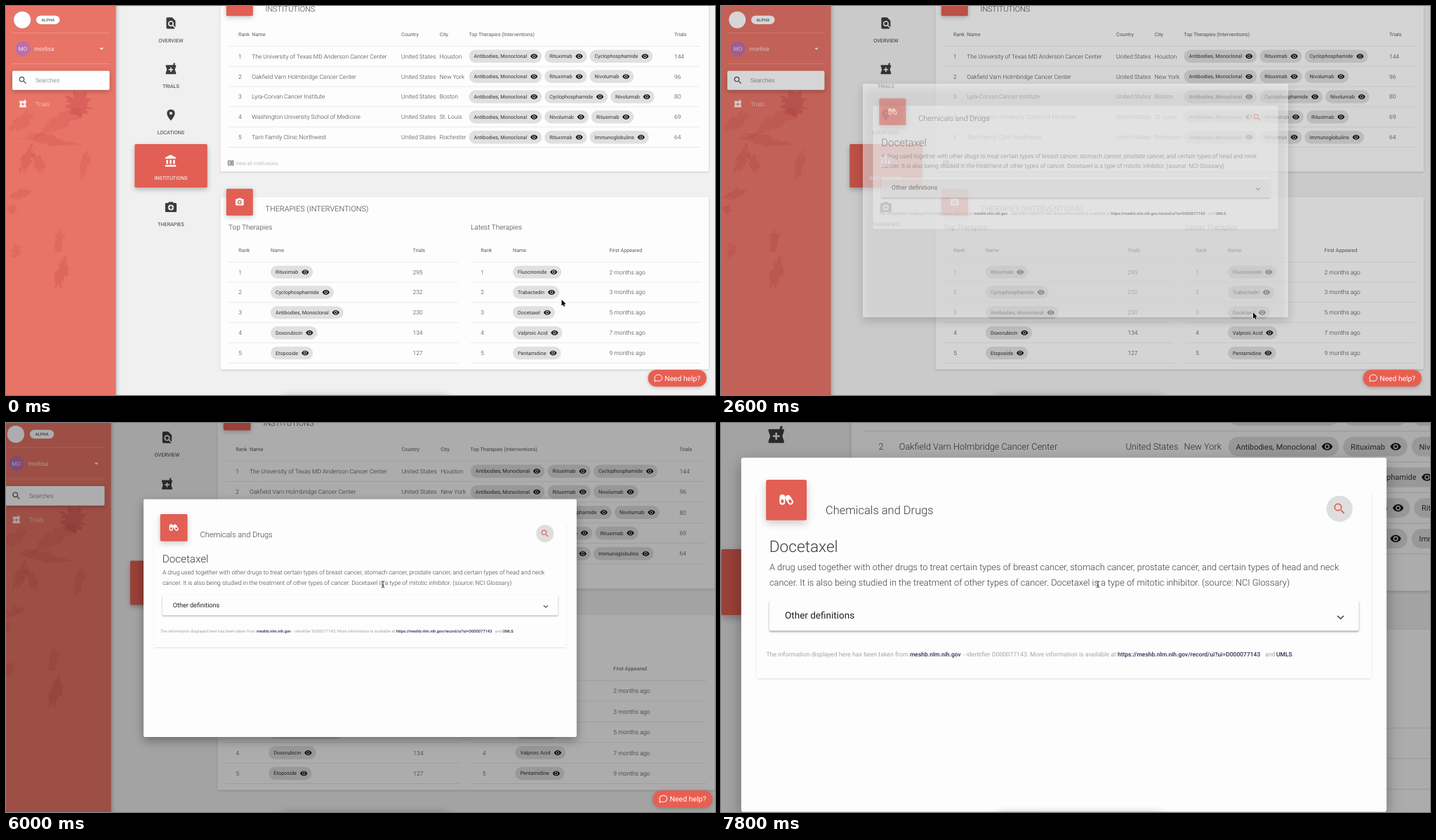
An HTML page with a canvas for the animation above (8 s loop, 1010 by 555 pixels).

```html
<!DOCTYPE html>
<html lang="en">
<head>
<meta charset="utf-8">
<title>Trial dashboard</title>
<style>
  html, body { margin: 0; width: 100%; height: 100%; overflow: hidden; background: #eee; }
  canvas { display: block; width: 1010px; height: 555px; }
</style>
</head>
<body>
<canvas id="stage" width="1010" height="555"></canvas>
<script>
const W = 1010, H = 555, LOOP = 8000, STEP = 200;
const ctx = document.getElementById('stage').getContext('2d');
const RED = '#e15f54', INK = '#3c3c3c', RULE = '#e2e2e2';
const BODY = 8.43, SMALL = 7.25;
const FOCUS = { x: 537, y: 230 };
let zoom = 1;

const icons = {
  eye: 'M12 4.5C7 4.5 2.73 7.61 1 12c1.73 4.39 6 7.5 11 7.5s9.27-3.11 11-7.5c-1.73-4.39-6-7.5-11-7.5zM12 17a5 5 0 1 1 0-10 5 5 0 0 1 0 10zm0-8a3 3 0 1 0 0 6 3 3 0 0 0 0-6z',
  search: 'M15.5 14h-.79l-.28-.27A6.47 6.47 0 0 0 16 9.5 6.5 6.5 0 1 0 9.5 16c1.61 0 3.09-.59 4.23-1.57l.27.28v.79l5 4.99L20.49 19zm-6 0a4.5 4.5 0 1 1 0-9 4.5 4.5 0 0 1 0 9z',
  page: 'M20 19.59V8l-6-6H6a2 2 0 0 0-2 2v16a2 2 0 0 0 2 2h12c.45 0 .85-.15 1.19-.4l-4.43-4.43A5 5 0 1 1 17 13c0 1.02-.31 1.96-.83 2.75zM9 13a3 3 0 1 0 6 0 3 3 0 0 0-6 0z',
  pharmacy: 'M21 5h-2.64l1.14-3.14L17.15 1l-1.46 4H3v2l2 6-2 6v2h18v-2l-2-6 2-6zm-5 9h-3v3h-2v-3H8v-2h3V9h2v3h3z',
  pin: 'M12 2a7 7 0 0 0-7 7c0 5.25 7 13 7 13s7-7.75 7-13a7 7 0 0 0-7-7zm0 9.5a2.5 2.5 0 0 1 0-5 2.5 2.5 0 0 1 0 5z',
  bank: 'M4 10v7h3v-7zm6 0v7h3v-7zM2 22h19v-3H2zm14-12v7h3v-7zm-4.5-9L2 6v2h19V6z',
  kit: 'M9 3 7 5H4a2 2 0 0 0-2 2v12a2 2 0 0 0 2 2h16a2 2 0 0 0 2-2V7a2 2 0 0 0-2-2h-3l-2-2zM12 18a5 5 0 1 1 0-10 5 5 0 0 1 0 10zM11 10h2v2h2v2h-2v2h-2v-2H9v-2h2z',
  list: 'M2 3h20v18H2zM4 5v14h16V5zM6 7h2v2H6zm4 0h8v2h-8zM6 11h2v2H6zm4 0h8v2h-8zM6 15h2v2H6zm4 0h8v2h-8z'
};
for (const name in icons) icons[name] = new Path2D(icons[name]);

const pointers = {
  arrow: new Path2D('M0 0V8.7L2 6.9 3.3 9.8 4.8 9.2 3.6 6.2H6.2z'),
  hand: new Path2D('M-.9.8a.9.9 0 0 1 1.8 0V4l3.4.7c.8.2 1.2.7 1.1 1.5L4.8 9 4.2 10.8H0L-2.6 7.2c-.6-.9.4-1.5 1-1l.7.7z')
};

const clamp = (v) => Math.max(0, Math.min(1, v));
const smooth = (t, a, b) => { const u = clamp((t - a) / (b - a)); return u * u * (3 - 2 * u); };
const mix = (a, b, u) => a + (b - a) * u;

function setFont(size, weight) {
  ctx.font = `${weight} ${size}px Roboto, "Open Sans", sans-serif`;
}

// y is the middle of the capital letters
function text(str, x, y, size = BODY, color = INK, weight = 300, align = 'left') {
  setFont(size, weight);
  ctx.textAlign = align;
  ctx.fillStyle = color;
  ctx.fillText(str, x, y + size * 0.355);
}

function icon(name, cx, cy, size, color) {
  ctx.save();
  ctx.translate(cx - size / 2, cy - size / 2);
  ctx.scale(size / 24, size / 24);
  ctx.fillStyle = color;
  ctx.fill(icons[name], 'evenodd');
  ctx.restore();
}

function box(x, y, w, h, r, fill, blur = 0, drop = 0, shade = 0) {
  ctx.save();
  if (blur) {
    ctx.shadowColor = `rgba(0,0,0,${shade})`;
    ctx.shadowBlur = blur * zoom;
    ctx.shadowOffsetY = drop * zoom;
  }
  ctx.fillStyle = fill;
  ctx.beginPath();
  ctx.roundRect(x, y, w, h, r);
  ctx.fill();
  ctx.restore();
}

function disc(x, y, r, fill) {
  ctx.fillStyle = fill;
  ctx.beginPath();
  ctx.arc(x, y, r, 0, 7);
  ctx.fill();
}

function rule(x1, x2, y, color = RULE, thick = 0.7) {
  ctx.fillStyle = color;
  ctx.fillRect(x1, y - thick / 2, x2 - x1, thick);
}

function chip(label, x, y) {
  setFont(SMALL, 400);
  const w = ctx.measureText(label).width;
  box(x, y - 9.2, w + 28, 18.4, 9.2, '#e0e0e0');
  text(label, x + 7, y, SMALL, '#333', 400);
  icon('eye', x + w + 17, y, 11, '#161616');
  return x + w + 32;
}

// Rough paint marks: x, y, radii, tilt, opacity
const marks = [
  [104, 140, 22, 19, 0.2, 0.24], [78, 165, 44, 13, -0.5, 0.12], [62, 192, 48, 8, 0.12, 0.15],
  [30, 218, 9, 26, 0.35, 0.18], [46, 224, 8, 17, -0.3, 0.16], [22, 268, 19, 8, -0.5, 0.16],
  [9, 290, 9, 8, 0.2, 0.16], [112, 226, 7, 22, 0.25, 0.14], [76, 335, 8, 20, 0.2, 0.16],
  [79, 380, 10, 27, 0.2, 0.18], [15, 348, 8, 12, 0.5, 0.14], [20, 165, 25, 11, -0.6, 0.12]
];

function paint() {
  let seed = 7;
  const rnd = () => (seed = (seed * 16807) % 2147483647) / 2147483647;
  for (const [x, y, rx, ry, tilt, alpha] of marks) {
    ctx.save();
    ctx.translate(x, y);
    ctx.rotate(tilt);
    ctx.beginPath();
    for (let i = 0; i < 36; i++) {
      const a = i / 36 * Math.PI * 2, r = 0.45 + rnd() * 0.65;
      ctx.lineTo(Math.cos(a) * rx * r, Math.sin(a) * ry * r);
    }
    ctx.fillStyle = `rgba(180,45,50,${alpha})`;
    ctx.fill();
    ctx.restore();
  }
}

function sidebar() {
  box(0, -200, 156.5, 1000, 0, '#e77467', 6, 0, 0.3);
  ctx.save();
  ctx.beginPath();
  ctx.rect(0, 0, 156.5, H);
  ctx.clip();
  paint();
  ctx.restore();

  disc(23.2, 19.8, 12, '#fff');
  box(43, 13.7, 33.5, 12.2, 6.1, '#fff');
  text('ALPHA', 59.8, 19.8, 5.75, '#555', 500, 'center');
  rule(9, 147.5, 38.5, 'rgba(255,255,255,.3)');
  disc(24, 61, 10.5, '#bb6fad');
  text('MO', 24, 61, 8, '#f6e4f2', 400, 'center');
  text('morlisa', 40.5, 61, BODY, 'rgba(255,255,255,.82)', 400);
  ctx.fillStyle = '#fff';
  ctx.beginPath();
  ctx.moveTo(133.3, 59.8);
  ctx.lineTo(138.9, 59.8);
  ctx.lineTo(136.1, 62.6);
  ctx.fill();
  rule(9, 147.5, 82.5, 'rgba(255,255,255,.3)');
  box(9, 92.5, 138.5, 27.3, 1.7, '#fefefe', 6, 2, 0.25);
  icon('search', 24, 106, 14, '#444');
  text('Searches', 42, 106, BODY, '#666');
  icon('pharmacy', 24, 139.5, 13.5, 'rgba(255,255,255,.9)');
  text('Trials', 42, 139.7, BODY, 'rgba(255,255,255,.8)');
}

function nav() {
  box(183.3, 197, 103.5, 62, 1.7, RED, 7, 3, 0.25);
  const items = [['page', 'OVERVIEW'], ['pharmacy', 'TRIALS'], ['pin', 'LOCATIONS'],
    ['bank', 'INSTITUTIONS'], ['kit', 'THERAPIES']];
  items.forEach(([name, label], i) => {
    const y = 24.3 + i * 65.6, color = i === 3 ? '#fff' : INK;
    icon(name, 234.9, y, 19.5, color);
    text(label, 234.9, y + 24.8, SMALL, color, 400, 'center');
  });
}

const MAB = 'Antibodies, Monoclonal', RTX = 'Rituximab', CYC = 'Cyclophosphamide', NIV = 'Nivolumab';
const places = [
  ['The University of Texas MD Anderson Cancer Center', 'Houston', 144, MAB, RTX, CYC],
  ['Oakfield Varn Holmbridge Cancer Center', 'New York', 96, MAB, RTX, NIV],
  ['Lyra-Corvan Cancer Institute', 'Boston', 80, MAB, CYC, NIV],
  ['Washington University School of Medicine', 'St. Louis', 69, MAB, NIV, RTX],
  ['Tarn Family Clinic Northwest', 'Rochester', 64, MAB, RTX, 'Immunoglobulins']
];
const top5 = [[RTX, 295], [CYC, 232], [MAB, 230], ['Doxorubicin', 134], ['Etoposide', 127]];
const latest = [['Fluocinonide', 2], ['Trabectedin', 3], ['Docetaxel', 5], ['Valproic Acid', 7], ['Pentamidine', 9]]
  .map(([name, n]) => [name, n + ' months ago']);

const head = (label, x, y) => text(label, x, y, 7.2, '#5c5c5c', 400);

function institutions() {
  box(305.5, -60, 695.5, 296.3, 2, '#fdfdfd', 3, 1, 0.18);
  box(313.8, -24, 38, 38.3, 1.7, RED, 7, 2, 0.22);
  text('INSTITUTIONS', 369.5, 4.3, 10.85, INK);
  [['Rank', 331], ['Name', 350.3], ['Country', 563], ['City', 617.8],
    ['Top Therapies (Interventions)', 659.3], ['Trials', 952]].forEach(([s, x]) => head(s, x, 40.5));
  rule(316.5, 989, 57.3);
  places.forEach(([name, city, trials, ...drugs], i) => {
    const y = 71.7 + i * 28.87;
    text(i + 1, 331, y);
    text(name, 350.3, y);
    text('United States', 563, y);
    text(city, 617.8, y);
    let x = 659.5;
    for (const drug of drugs) x = chip(drug, x, y);
    text(trials, 952, y);
    rule(316.5, 989, y + 14.4);
  });
  icon('list', 320.2, 224, 9.5, '#444');
  text('View all institutions', 327, 224, 7.15, '#a0a0a0');
}

function ranking(title, x, unit, unitX, rows) {
  text(title, x, 315.3, 10.04, INK);
  head('Rank', x + 14.3, 348.5);
  head('Name', x + 60, 348.5);
  head(unit, unitX, 348.5);
  rule(x - 0.5, x + 327.5, 365.3);
  rows.forEach(([name, value], i) => {
    const y = 379.6 + i * 28.87;
    text(i + 1, x + 14.3, y);
    chip(name, x + 60, y);
    text(value, unitX, y);
    rule(x - 0.5, x + 327.5, y + 14.4);
  });
}

function therapies() {
  box(305.5, 272.5, 695.5, 246, 2, '#fdfdfd', 3, 1, 0.18);
  box(313.8, 260.8, 38, 38.2, 1.7, RED, 7, 2, 0.22);
  icon('kit', 332.8, 279.3, 14, '#fff');
  text('THERAPIES (INTERVENTIONS)', 369.5, 289.3, 10.85, INK);
  ranking('Top Therapies', 317, 'Trials', 579.5, top5);
  ranking('Latest Therapies', 662, 'First Appeared', 859.5, latest);
}

function capsule(x, y, angle) {
  ctx.save();
  ctx.translate(x, y);
  ctx.rotate(angle);
  box(-2.6, -4.8, 5.2, 9.6, 2.6, '#fff');
  box(-1.3, -0.2, 2.6, 3.6, 1.2, RED);
  ctx.restore();
}

function dialog() {
  box(202, 111, 606, 333.1, 2, '#fdfdfd', 14, 5, 0.35);
  box(216.5, 142.5, 577, 176, 2, '#fdfdfd', 2, 0.8, 0.12);
  box(225.3, 131.7, 38.2, 38.2, 1.7, RED, 8, 3, 0.2);
  capsule(240.6, 150.5, 0);
  capsule(247.1, 150.7, -0.55);
  text('Chemicals and Drugs', 281.2, 160.5, 10.85, INK);
  disc(763.8, 159, 12.3, '#dedede');
  icon('search', 763.8, 159, 13.5, RED);
  text('Docetaxel', 228.3, 194.2, 14.95, INK);
  text('A drug used together with other drugs to treat certain types of breast cancer, stomach cancer, prostate cancer, and certain types of head and neck', 228.5, 213.7);
  text('cancer. It is also being studied in the treatment of other types of cancer. Docetaxel is a type of mitotic inhibitor. (source: NCI Glossary)', 228.5, 228.2);
  box(228.4, 245, 553.5, 28.6, 1.7, '#fdfdfd', 2, 1.2, 0.35);
  text('Other definitions', 243, 259.3, 8.92, '#222', 400);
  ctx.strokeStyle = '#555';
  ctx.lineWidth = 1.1;
  ctx.beginPath();
  ctx.moveTo(761.8, 259.7);
  ctx.lineTo(764.8, 262.6);
  ctx.lineTo(767.8, 259.7);
  ctx.stroke();
  const note = [
    [225.5, 'The information displayed here has been taken from'],
    [360.3, 'meshb.nlm.nih.gov', true],
    [410.5, '- identifier D000077143. More information is available at'],
    [555.4, 'https://meshb.nlm.nih.gov/record/ui?ui=D000077143', true],
    [693.9, 'and'],
    [704.4, 'UMLS', true],
    [720, '.']
  ];
  for (const [x, str, link] of note)
    text(str, x, 295.7, link ? 5.61 : 5.77, link ? '#2b3050' : '#a3a3a3', link ? 500 : 400);
}

function helpButton() {
  box(914.5, 519, 83.5, 24, 12, '#e85f52', 5, 1.5, 0.22);
  ctx.strokeStyle = '#fff';
  ctx.lineWidth = 1;
  ctx.beginPath();
  ctx.ellipse(929.3, 530.6, 5.3, 4.6, 0, 2.75, 2.1 + Math.PI * 2);
  ctx.lineTo(924.2, 535.8);
  ctx.closePath();
  ctx.stroke();
  text('Need help?', 938.3, 531.2, 10.3, '#fff', 400);
}

function pointer(t, open) {
  const go = 1 - Math.pow(1 - clamp((t - 100) / 1500), 3);
  const back = smooth(t, 3000, 4400);
  const x = mix(mix(791.5, 758, go), 537, back);
  const y = mix(mix(419, 437.3, go), 233, back);
  ctx.save();
  ctx.lineJoin = 'round';
  if (t >= 5200) {
    ctx.translate(FOCUS.x, FOCUS.y);
    for (const [color, width] of [['#fff', 2], ['#111', 0.9]]) {
      ctx.strokeStyle = color;
      ctx.lineWidth = width;
      ctx.beginPath();
      ctx.moveTo(-2.2, -4.3);
      ctx.quadraticCurveTo(0, -4.3, 0, -3);
      ctx.lineTo(0, 3.2);
      ctx.quadraticCurveTo(0, 4.5, -2.2, 4.5);
      ctx.moveTo(2.2, -4.3);
      ctx.quadraticCurveTo(0, -4.3, 0, -3);
      ctx.moveTo(0, 3.2);
      ctx.quadraticCurveTo(0, 4.5, 2.2, 4.5);
      ctx.moveTo(-1.3, 1.4);
      ctx.lineTo(1.3, 1.4);
      ctx.stroke();
    }
  } else {
    ctx.translate(x, y);
    const hand = !open && x > 722 && x < 781 && y > 428;
    const shape = pointers[hand ? 'hand' : 'arrow'];
    ctx.strokeStyle = hand ? '#111' : '#fff';
    ctx.fillStyle = hand ? '#fff' : '#000';
    ctx.lineWidth = hand ? 0.9 : 1.3;
    ctx.stroke(shape);
    ctx.fill(shape);
  }
  ctx.restore();
}

function draw(t) {
  const open = smooth(t, 2400, 2800);
  zoom = 1 + 0.517 * smooth(t, 5936, 6506);
  ctx.setTransform(zoom, 0, 0, zoom, FOCUS.x * (1 - zoom), FOCUS.y * (1 - zoom));
  ctx.textRendering = 'geometricPrecision';
  ctx.fillStyle = '#f0f0f0';
  ctx.fillRect(-50, -50, W + 100, H + 100);
  nav();
  institutions();
  therapies();
  sidebar();
  if (open) {
    ctx.fillStyle = `rgba(0,0,0,${0.32 * open})`;
    ctx.fillRect(-50, -50, W + 100, H + 100);
    ctx.globalAlpha = open;
    dialog();
    ctx.globalAlpha = 1;
  }
  helpButton();

  ctx.setTransform(1, 0, 0, 1, 0, 0);
  zoom = 1;
  box(392, 557, 238, 20, 8, '#999', 12, 0, 0.3);
  pointer(t, open > 0);
}

const start = performance.now();
function tick() {
  const t = (performance.now() - start) % LOOP;
  draw(Math.floor(t / STEP) * STEP);
  requestAnimationFrame(tick);
}
tick();
</script>
</body>
</html>
```
